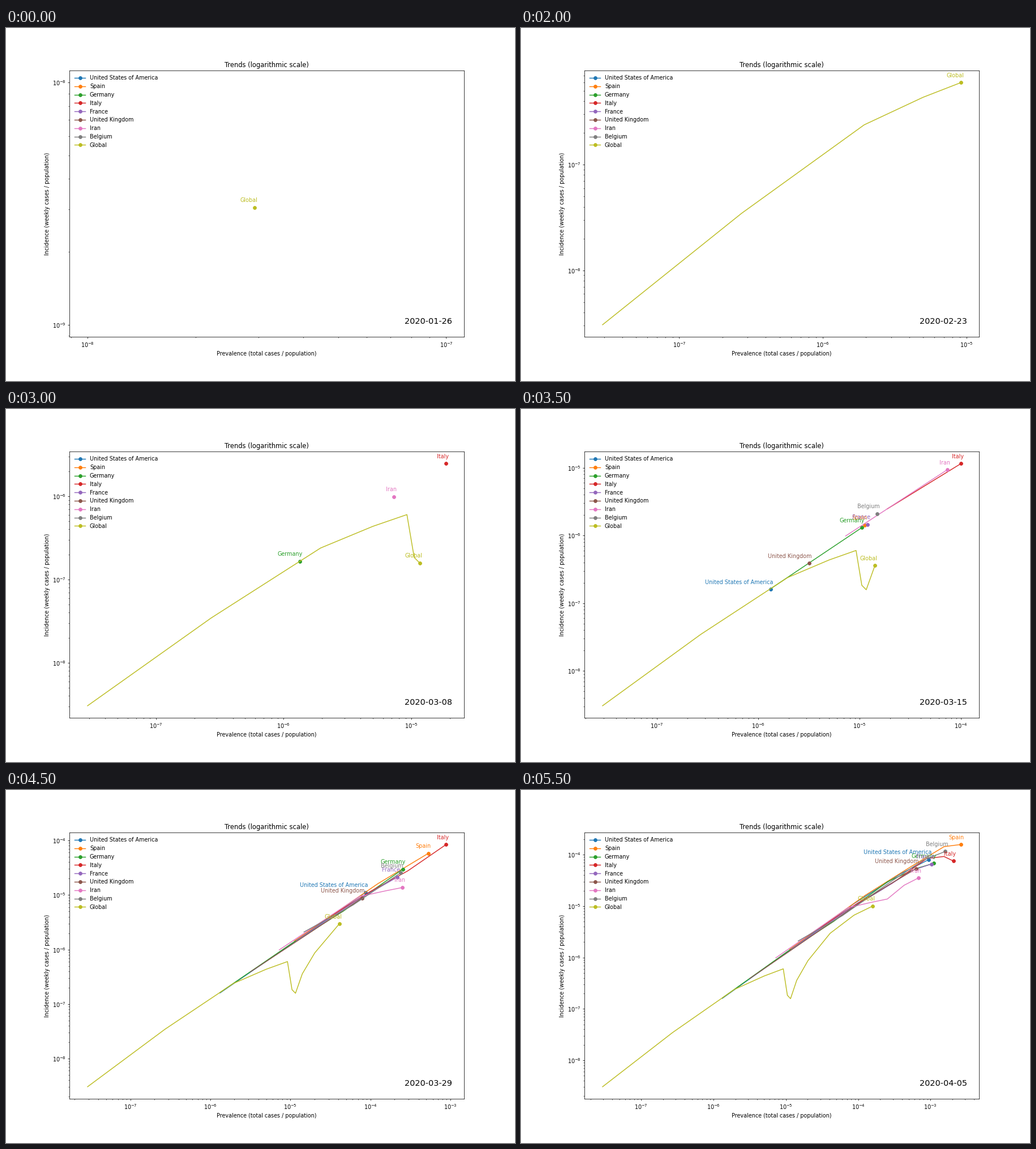
Recreate the animation shown at these times as a matplotlib script. Size 899x623 px, loop 7.5 s.

```python
import matplotlib.pyplot as plt
import numpy as np
from matplotlib.animation import FuncAnimation
from matplotlib.ticker import NullFormatter

W, H, DPI = 899, 623, 69.2
WEEKS = 12
HOLD = 3  # extra ticks on the last week
START = np.datetime64("2020-01-26")

# Cases per million: total before the first week, then mean daily cases by week.
RATES = {
    "United States of America": (0.2, [0.16, 1.1, 11.1, 42.5, 80.6]),
    "Spain": (1.2, [1.43, 16.12, 58.3, 144, 158.5]),
    "Germany": (0.182, [0.165, 1.31, 5.04, 29.9, 54, 68.3]),
    "Italy": (1.345, [2.475, 11.62, 27.8, 84.5, 92.5, 75.6]),
    "France": (1.68, [1.46, 7.98, 21.2, 50, 66]),
    "United Kingdom": (0.44, [0.39, 1.995, 8.75, 25.3, 53.3]),
    "Iran": (0.37, [0.985, 9.37, 11.96, 13.75, 25.5, 35.3]),
    "Belgium": (0.1, [2.1, 6.53, 25.5, 78, 116]),
    "Global": (0.0079, [0.00305, 0.0346, 0.239, 0.4355, 0.602, 0.184,
                        0.158, 0.359, 0.869, 2.96, 6.68, 10]),
}


def series(base, rates):
    """Weekly prevalence and incidence, NaN before the first report."""
    rates = np.array(rates, float)
    out = np.full((2, WEEKS), np.nan)
    out[:, -len(rates):] = base + 7 * np.cumsum(rates), rates
    return out * 1e-6


def log_limits(values):
    """Log-space limits with a 5 % margin; whole decades for a single point."""
    lo, hi = np.log10([np.nanmin(values), np.nanmax(values)])
    if lo == hi:
        lo, hi = np.floor(lo), np.ceil(hi)
    pad = 0.05 * (hi - lo)
    return 10 ** (lo - pad), 10 ** (hi + pad)


data = np.array([series(*r) for r in RATES.values()])

plt.rcParams["font.family"] = "DejaVu Sans"
fig, ax = plt.subplots(figsize=((W + 0.01) / DPI, (H + 0.01) / DPI), dpi=DPI)
fig.subplots_adjust(left=0.125, right=0.9, bottom=0.125, top=0.88)
ax.set(xscale="log", yscale="log", title="Trends (logarithmic scale)",
       xlabel="Prevalence (total cases / population)",
       ylabel="Incidence (weekly cases / population)")
for axis in (ax.xaxis, ax.yaxis):
    axis.set_minor_formatter(NullFormatter())

lines, tags = [], []
for k, name in enumerate(RATES):
    color = f"C{k}"
    line, = ax.plot([np.nan], [np.nan], "-o", color=color, label=name,
                    markevery=[-1])
    lines.append(line)
    tags.append(ax.annotate(name, (1e-8, 1e-8), xytext=(5, 10),
                            textcoords="offset points", ha="right",
                            color=color, visible=False))
ax.legend(loc="upper left", frameon=False)
date = ax.text(0.97, 0.05, "", transform=ax.transAxes, ha="right", fontsize=15)


def update(tick):
    week = min(tick, WEEKS - 1)
    shown = data[:, :, :week + 1]
    ax.set_xlim(log_limits(shown[:, 0]))
    ax.set_ylim(log_limits(shown[:, 1]))
    for line, tag, (x, y) in zip(lines, tags, shown):
        line.set_data(x, y)
        started = bool(np.isfinite(x[-1]))
        tag.set_visible(started)
        if started:
            tag.xy = x[-1], y[-1]
    # The date stops one week before the data does.
    date.set_text(str(START + 7 * min(week, WEEKS - 2)))
    return [*lines, *tags, date]


anim = FuncAnimation(fig, update, frames=WEEKS + HOLD, interval=500,
                     repeat=True, repeat_delay=0, blit=False)
plt.show()
```
